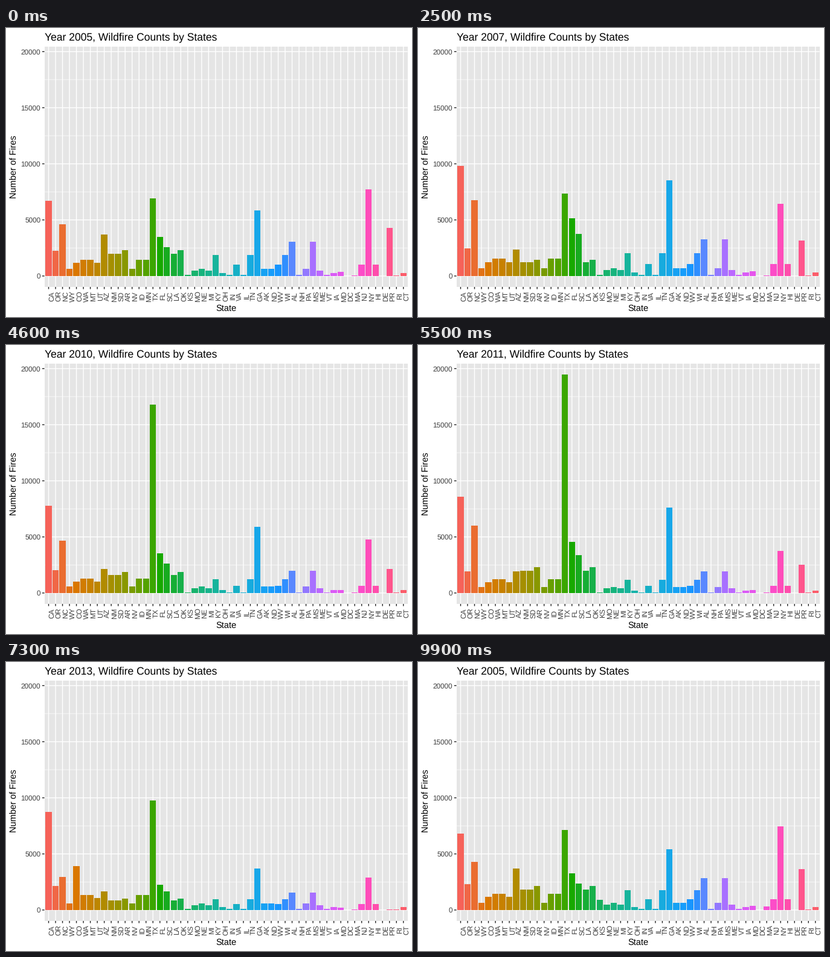
Animation, 672 px wide and 480 px high, one loop 10000 ms. Source, as a matplotlib script:

```python
import numpy as np
import matplotlib.pyplot as plt
from matplotlib.animation import FuncAnimation

plt.rcParams.update({"font.family": "Liberation Sans", "text.hinting": "none"})

W, H, DPI = 672, 480, 96
LEFT, RIGHT, TOP, BOTTOM = 63.6, 664.67, 31, 430
Y_MAX = 19470
FRAMES, STEP_MS, TWEEN = 100, 100, 4
YEARS = np.arange(2005, 2016)
ARRIVALS = [0, 9] + [9 * k + 1 for k in range(2, len(YEARS) + 1)]

STATES = ("CA OR NC WY CO WA MT UT AZ NM SD AR NV ID MN TX FL SC LA OK KS MO NE MI KY OH "
          "IN VA IL TN GA AK ND WV WI AL NH PA MS ME VT IA MD DC MA NJ NY HI DE PR RI CT").split()

counts = np.zeros((len(YEARS), len(STATES)))


def add_region(trend, levels):
    """Scale one trend, given every second year, to the level of each state."""
    curve = np.interp(YEARS, YEARS[::2], trend)
    for level, states in levels.items():
        for state in states.split():
            counts[:, STATES.index(state)] = level * curve


add_region((1.07, 1.63, 0.77, 1.4, 0.68, 0.53),
           {5450: "GA", 4300: "NC", 3270: "FL", 2400: "SC"})
add_region((1.35, 1.5, 0.9, 0.85, 0.7, 0.75),
           {2250: "AL MS", 1400: "TN KY WI", 750: "VA NJ WV HI", 280: "MD"})
add_region((1.45, 0.9, 0.9, 1.45, 0.63, 0.72),
           {1600: "AR OK", 1350: "NM SD LA"})
add_region((1, 1.1, 0.95, 0.85, 0.95, 1.15),
           {2270: "OR", 1430: "WA MT ID MN", 1150: "UT CO", 620: "WY NV AK ND PA NE",
            470: "MO MI ME", 270: "CT OH IA", 80: "KS IN IL NH VT", 25: "MA RI"})
add_region((6.7, 10.05, 6.97, 8.57, 8.73, 7.39), {1000: "CA"})
add_region((6.9, 6.83, 14.15, 19.47, 9.75, 8.3), {1000: "TX"})
add_region((7.7, 6.49, 5.78, 3.74, 2.88, 5.88), {1000: "NY"})
add_region((4.28, 3.27, 1.72, 2.51, 0.03, 0.04), {1000: "PR"})
add_region((3.68, 2.36, 2.35, 1.92, 1.65, 3.79), {1000: "AZ"})

counts[1] *= 1.2  # 2006 was a busy year everywhere
for state, year, peak in (("CO", 2013, 3900), ("KS", 2015, 5890), ("MA", 2015, 2180)):
    counts[year - YEARS[0], STATES.index(state)] = peak


def hue_color(hue, chroma=100, light=65):
    """Polar LUV colour, darkened as on a gamma 1.8 display."""
    angle = np.radians(hue)
    y = ((light + 16) / 116) ** 3
    u = chroma * np.cos(angle) / (13 * light) + 0.1978
    v = chroma * np.sin(angle) / (13 * light) + 0.4683
    x = 9 * y * u / (4 * v)
    z = 3 * y / v - 5 * y - x / 3
    rgb = np.array([[3.2405, -1.5371, -0.4985],
                    [-0.9693, 1.8760, 0.0416],
                    [0.0556, -0.2040, 1.0572]]) @ (x, y, z)
    rgb = np.clip(rgb, 0, 1)
    rgb = np.where(rgb > 0.0031308, 1.055 * rgb ** (1 / 2.4) - 0.055, 12.92 * rgb)
    rgb = np.clip(rgb, 0, 1) ** 1.24
    rgb[0] = max(rgb[0], 0.09)
    return rgb


def y_px(value):
    unit = (BOTTOM - TOP) / (1.1 * Y_MAX)
    return BOTTOM - (value + 0.05 * Y_MAX) * unit


pitch = (RIGHT - LEFT) / (len(STATES) + 0.2)
xs = LEFT + pitch * (0.6 + np.arange(len(STATES)))
majors = np.arange(0, 20001, 5000)

fig = plt.figure(figsize=(W / DPI, H / DPI), dpi=DPI, facecolor="white")
ax = fig.add_axes([0, 0, 1, 1])
ax.set(xlim=(0, W), ylim=(H, 0))
ax.axis("off")


def box(x, y, width, height, color, z):
    return ax.add_patch(plt.Rectangle((x, y), width, height, facecolor=color,
                                      lw=0, zorder=z, snap=True))


def lines(draw, at, start, end, color, px, z):
    draw(at, start, end, colors=color, linewidths=px * 72 / DPI, zorder=z, snap=False)


def label(x, y, text, size, color="black", **kw):
    return ax.text(x, y, text, fontsize=size, color=color, va="baseline",
                   rotation_mode="anchor", **kw)


box(LEFT, TOP, RIGHT - LEFT, BOTTOM - TOP, "#E5E5E5", 0)
lines(ax.hlines, y_px(majors[:-1] + 2500), LEFT, RIGHT, "white", 0.71, 1)
lines(ax.hlines, y_px(majors), LEFT, RIGHT, "white", 1.42, 1)
lines(ax.vlines, xs, TOP, BOTTOM, "white", 1.42, 1)
lines(ax.hlines, y_px(majors), LEFT - 3.67, LEFT, "#262626", 1.42, 3)
lines(ax.vlines, xs, BOTTOM, BOTTOM + 3.67, "#262626", 1.42, 3)

bars = []
for i, (x, state) in enumerate(zip(xs, STATES)):
    color = hue_color(15 + 360 * i / len(STATES))
    bars.append(box(x - 0.45 * pitch, y_px(0), 0.9 * pitch, 0, color, 2))
    label(x + 8.6, 445.6, state, 8.8, "#404040", ha="center", rotation=90)

for value in majors:
    label(57.2, y_px(value) + 4.2, str(value), 8.8, "#404040", ha="right")
label((LEFT + RIGHT) / 2, 470, "State", 11, ha="center")
label(18, (TOP + BOTTOM) / 2, "Number of Fires", 11, ha="center", rotation=90)
title = label(LEFT, 20, "", 13.15)


def update(frame):
    now = max(k for k, start in enumerate(ARRIVALS) if start <= frame)
    following = (now + 1) % len(YEARS)
    progress = max(0, 1 - (ARRIVALS[now + 1] - frame) / TWEEN)
    ease = (1 - np.cos(np.pi * progress)) / 2
    values = counts[now] + ease * (counts[following] - counts[now])
    for bar, top in zip(bars, y_px(values)):
        bar.set_height(top - y_px(0))
    shown = YEARS[following if progress > 0.5 else now]
    title.set_text(f"Year {shown}, Wildfire Counts by States")
    return [*bars, title]


anim = FuncAnimation(fig, update, frames=FRAMES, interval=STEP_MS, repeat=True, repeat_delay=0)
plt.show()
```
